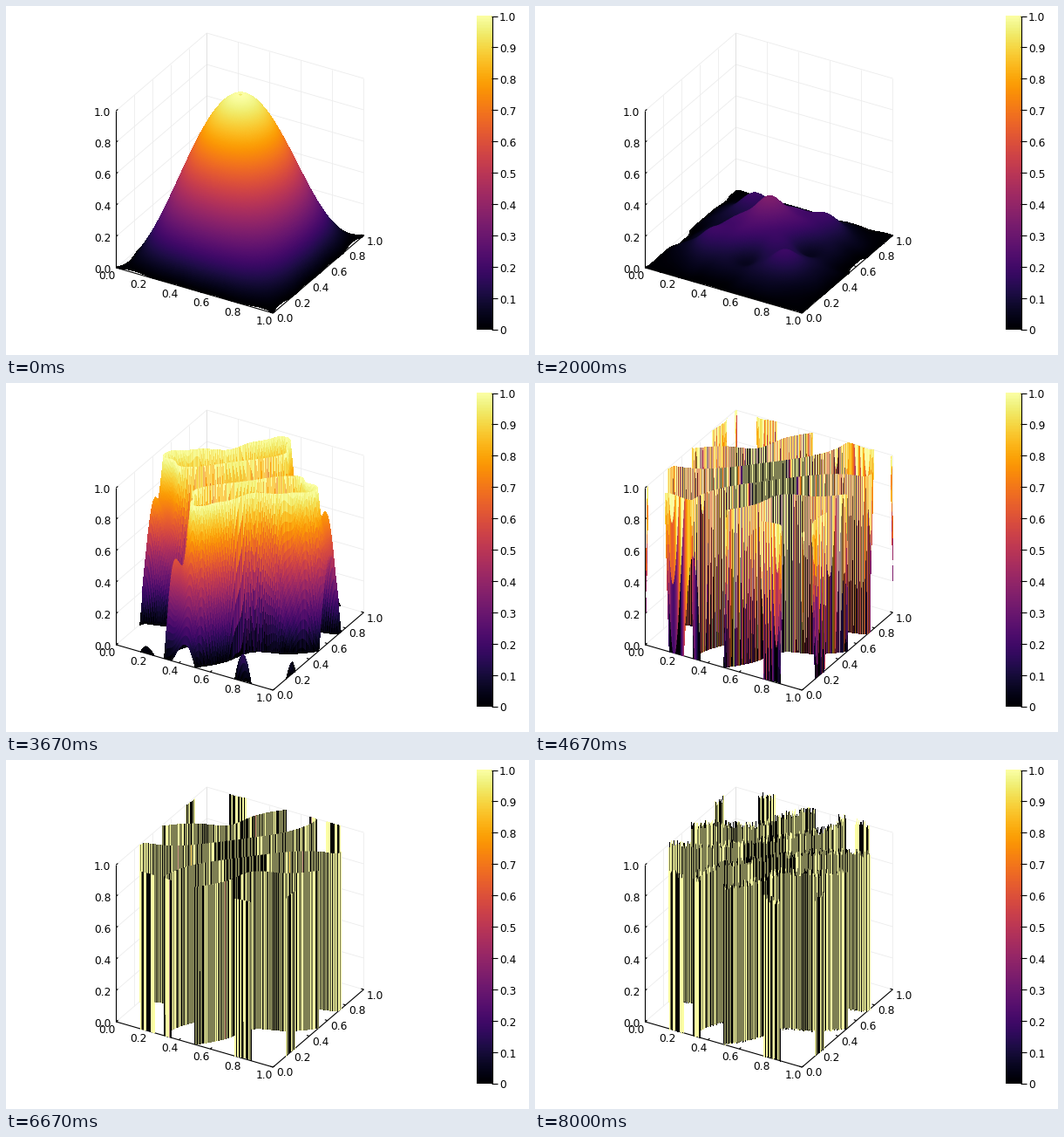
A matplotlib script that plays this animation: 600x400 px, repeating every 8.33 s.

```python
import numpy as np
import matplotlib.pyplot as plt
from matplotlib.animation import FuncAnimation

FRAMES, LOOP = 25, 8330
W, H, DPI = 600, 400, 100
CELLS = 320          # mesh cells per side
SS = 2               # supersampling of the surface image
LEFT, RIGHT, TOP, BOTTOM = 120, 418, 24, 360
CMAP = plt.get_cmap("inferno")


def project(x, y, z):
    return 127 + 180 * x + 104 * y, 300 + 52 * x - 89 * y - 180 * z


def front_edge(x):
    return -1.6 * np.sin(4 * np.pi * x) * (x - 0.145) * (x - 0.345) * (x - 0.86)


def side_edge(y):
    return 0.25 * np.sin(4 * np.pi * y) * (0.13 - y) * (1.05 - y)


def growing_mode(x, y):
    """Checkerboard of humps, split by wavy lines along the diagonal."""
    v, w = x - y, x + y - 1
    inner = 0.14 + 0.6 * w ** 4
    outer = 0.5 - 0.125 * np.exp(-(w / 0.2) ** 2)
    sign = np.tanh((inner ** 2 - v ** 2) / 0.018) * np.tanh((outer ** 2 - v ** 2) / 0.05)

    def weight(t):
        return np.sin(np.pi * t) * (0.4 + 0.6 * np.cos(4 * np.pi * t) ** 2)

    def fade(t):
        return np.exp(-t / 0.06)

    edges = (front_edge(x) * fade(y) + front_edge(1 - x) * fade(1 - y)
             + side_edge(y) * fade(1 - x) + side_edge(1 - y) * fade(x))
    return sign * weight(x) * weight(y) + edges + 0.001


def ripple(along, across):
    edge = np.minimum(across, 1 - across)
    return 0.022 * np.sin(4 * np.pi * along) ** 2 * np.exp(-edge / 0.04)


# Rows run from the back (y = 1) to the front (y = 0).
xs, ys = np.linspace(0, 1, CELLS + 1), np.linspace(1, 0, CELLS + 1)
gx, gy = np.meshgrid(xs, ys)
mode = growing_mode(gx, gy)
hump = np.abs(np.sin(np.pi * gx) * np.sin(np.pi * gy)) ** 1.15
hump = hump - ripple(gx, gy) - ripple(gy, gx)

# Each image column is a line over the floor, cut at every mesh row.
cols = LEFT + (np.arange((RIGHT - LEFT) * SS) + 0.5) / SS
lx = (cols[None] - 127 - 104 * ys[:, None]) / 180
floor = 300 + 52 * lx - 89 * ys[:, None]
u = np.clip(lx, 0, 1) * CELLS
cell = np.minimum(u.astype(int), CELLS - 1)
frac = u - cell
row = np.arange(CELLS + 1)[:, None]
mid = (lx[:-1] + lx[1:]) / 2
inside = (mid >= 0) & (mid <= 1)
quad = np.clip((mid * CELLS).astype(int), 0, CELLS - 1)
jitter = np.random.default_rng(4).uniform(-1, 1, (2, CELLS, CELLS))[:, row[:-1], quad]


def heights(n):
    growth = 0.15 * 2.35 ** (n - 6) * (-1) ** n
    return 0.785 ** n * hump + growth * mode


def surface(n):
    grid = heights(n)
    z = grid[row, cell] * (1 - frac) + grid[row, cell + 1] * frac
    mean = (grid[:-1, :-1] + grid[1:, :-1] + grid[:-1, 1:] + grid[1:, 1:]) / 4
    shade = mean[row[:-1], quad]

    # Rounding noise of the clip heights once the values are huge.
    rough = 0.028 * 2.35 ** (n - 24) if n > 20 else 0
    low = 0.25 * rough * jitter[0] - 0.002
    high = 1 + rough * jitter[1]

    # Part of every segment that lies between the two clip heights.
    z0, dz = z[:-1], np.diff(z, axis=0)
    dz = np.where(np.abs(dz) < 1e-12, 1e-12, dz)
    ta, tb = (low - z0) / dz, (high - z0) / dz
    t0 = np.maximum(np.minimum(ta, tb), 0)
    t1 = np.minimum(np.maximum(ta, tb), 1)
    k, c = np.nonzero((t1 > t0) & inside)

    def screen(t):
        py = floor[:-1] + np.diff(floor, axis=0) * t - 180 * (z0 + dz * t)
        return (py[k, c] - TOP) * SS

    pa, pb = screen(t0), screen(t1)
    rows = (BOTTOM - TOP) * SS
    first = np.clip(np.floor(np.minimum(pa, pb)), 0, rows - 1).astype(int)
    last = np.clip(np.floor(np.maximum(pa, pb)), 0, rows - 1).astype(int)
    size = last - first + 1
    step = np.arange(size.sum()) - np.repeat(np.cumsum(size) - size, size)

    # Later entries are nearer the viewer and overwrite the earlier ones.
    img = np.zeros((rows, len(cols), 4))
    color = CMAP(np.clip(shade[k, c], 0, 1))
    img[np.repeat(first, size) + step, np.repeat(c, size)] = np.repeat(color, size, axis=0)

    img = img.reshape(rows // SS, SS, len(cols) // SS, SS, 4).mean(axis=(1, 3))
    alpha = img[..., 3:]
    rgb = img[..., :3] / np.maximum(alpha, 1e-6)
    return np.concatenate([np.clip(rgb, 0, 1), alpha >= 0.5], axis=2)


fig = plt.figure(figsize=(W / DPI, H / DPI), dpi=DPI, facecolor="white")
ax = fig.add_axes([0, 0, 1, 1])
ax.axis("off")


def line(p, q, color="black", width=0.8, z=2):
    ax.plot([p[0] - 0.6, q[0] - 0.6], [p[1], q[1]], color=color, lw=width,
            zorder=z, solid_capstyle="butt")


def label(x, y, text, ha="center"):
    ax.text(x, y, text, ha=ha, va="center_baseline", fontsize=8.8,
            family="DejaVu Sans", zorder=6)


def draw_box():
    pale = "#ececec"
    for t in np.linspace(0, 1, 6):
        line(project(0, 0, t), project(0, 1, t), pale, 0.6, 1)
        line(project(0, 1, t), project(1, 1, t), pale, 0.6, 1)
        line(project(0, t, 0), project(0, t, 1), pale, 0.6, 1)
        line(project(t, 1, 0), project(t, 1, 1), pale, 0.6, 1)
    line(project(0, 1, 0), project(0, 1, 1), "#dedede", 0.6, 1)

    line(project(0, 0, 0), project(0, 0, 1))
    line(project(0, 0, 0), project(1, 0, 0))
    line(project(1, 0, 0), project(1, 1, 0))
    for t in np.linspace(0, 1, 6):
        text = f"{t:.1f}"
        x, y = project(0, 0, t)
        line((x, y), (x + 2, y - 1.5))
        label(120.5, y + 0.5, text, "right")
        x, y = project(t, 0, 0)
        line((x, y), (x + 2, y - 1.8))
        label(x - 11, y + 8, text)
        x, y = project(1, t, 0)
        line((x, y), (x - 3, y - 0.9))
        label(x + 12.5, y + 5.5, text)


def draw_colorbar():
    x0, x1, y0, y1 = 540, 558, 11.5, 371
    ramp = np.linspace(1, 0, 256)[:, None]
    ax.imshow(ramp, cmap=CMAP, extent=(x0, x1, y1, y0), aspect="auto",
              interpolation="nearest", zorder=2)
    line((x1 + 0.3, y0), (x1 + 0.3, y1), z=3)
    for i in range(11):
        y = y1 + (y0 - y1) * i / 10
        line((x1, y), (x1 + 6.5, y), z=3)
        label(566, y + 0.5, f"{i / 10:.1f}" if i else "0", "left")


draw_box()
draw_colorbar()
picture = ax.imshow(surface(0), extent=(LEFT, RIGHT, BOTTOM, TOP), aspect="auto",
                    interpolation="nearest", zorder=4)
ax.set_xlim(0, W)
ax.set_ylim(H, 0)


def update(n):
    picture.set_data(surface(n))
    return [picture]


anim = FuncAnimation(fig, update, frames=FRAMES, interval=LOOP / FRAMES,
                     repeat=True, repeat_delay=0, cache_frame_data=False)
plt.show()
```
